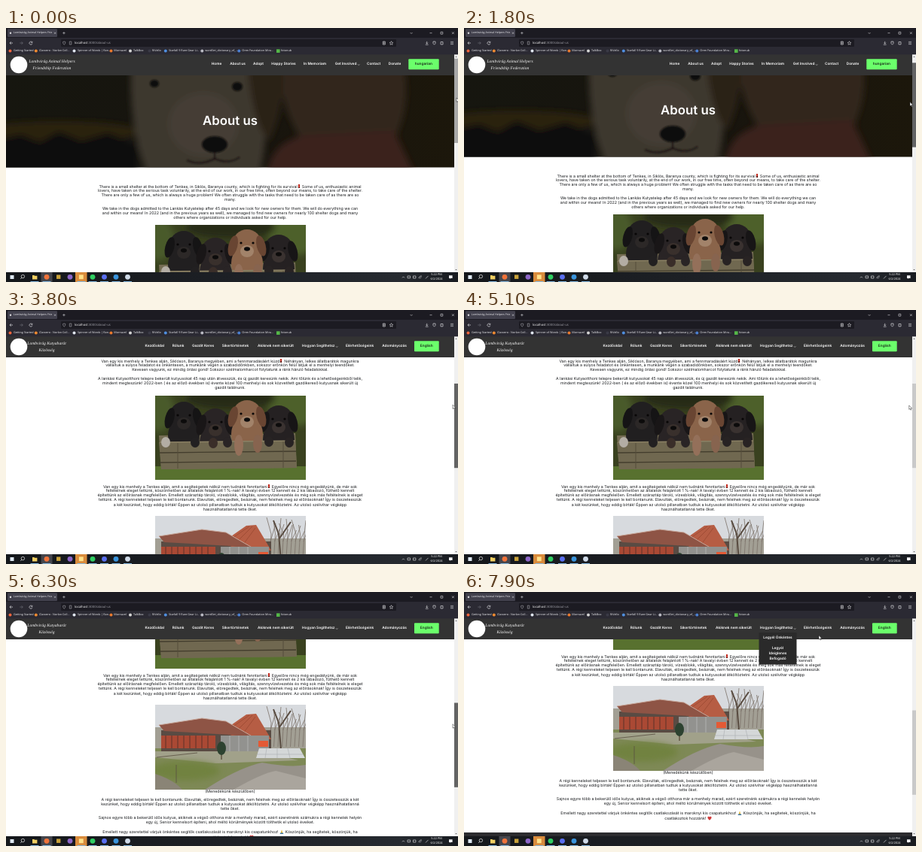
Write an HTML page that moves like this. It is 600 px wide and 338 px high and loops after 8 s.

```html
<!DOCTYPE html>
<html lang="en">
<head>
<meta charset="utf-8">
<title>Shelter site</title>
<style>
@property --s { syntax: "<number>"; inherits: true; initial-value: 0; }
@property --cx { syntax: "<number>"; inherits: true; initial-value: 0; }
@property --cy { syntax: "<number>"; inherits: true; initial-value: 0; }
html, body { margin: 0; width: 100%; height: 100%; overflow: hidden; background: #fff; }
#stage { position: relative; width: 600px; height: 338px; overflow: hidden; background: #fff;
  font-family: Inter, sans-serif; text-rendering: geometricPrecision;
  animation: s 8s linear -10ms infinite, cx 8s linear -10ms infinite, cy 8s linear -10ms infinite; }
#stage svg { position: absolute; left: 0; top: 0; overflow: visible; }
#doc { position: absolute; inset: 0; transform: translateY(calc(var(--s) * -1px)); }
#doc p { position: absolute; left: 0; width: 595px; margin: 0; text-align: center; white-space: pre;
  font-size: 5.27px; line-height: 6.09px; color: #16181b; }
#doc .foot { position: absolute; left: 0; width: 595px; height: 170px; background: #2c2c2f; color: #eee; font-size: 6px; }
.foot span { position: absolute; top: 12px; line-height: 8px; }
#doc .pic { left: 197.5px; width: 200px; height: 112.5px; overflow: hidden; }
#doc p svg { position: static; vertical-align: -1px; }
.mark { display: inline-block; width: 2px; height: 5.4px; margin: 0 1.5px 0 1px; vertical-align: -.8px; background: linear-gradient(#c0281c 70%, #5e120c 70%); }
.en { animation: en 8s step-end -10ms infinite; }
.hu { animation: hu 8s step-end -10ms infinite; }
.menu { animation: menu 8s step-end -10ms infinite; }
.thumb { transform: translateY(calc(var(--s) * .4px)); animation: thumb 8s step-end -10ms infinite; }
.cursor { transform: translate(calc(var(--cx) * 1px), calc((var(--cy) + var(--s) * .4) * 1px)); }
.ui { font-family: "Open Sans", sans-serif; }
.script { font: italic 5.6px "Liberation Serif", serif; }
text { dominant-baseline: central; }
.mid { text-anchor: middle; }
@keyframes en { 0% { visibility: visible } 32.5%, 100% { visibility: hidden } }
@keyframes hu { 0% { visibility: hidden } 32.5%, 100% { visibility: visible } }
@keyframes menu { 0% { visibility: hidden } 92.5%, 100% { visibility: visible } }
@keyframes thumb { 0% { fill: #a8a8a8 } 1.25% { fill: #636363 } 26.25% { fill: #c9c9c9 } 38.75% { fill: #636363 }
  51.25% { fill: #c9c9c9 } 65% { fill: #636363 } 90%, 100% { fill: #c9c9c9 } }
</style>
</head>
<body>
<div id="stage"></div>
<script>
const each = (list, fn) => list.map(fn).join('');
const rect = (x, y, w, h, fill, more = '') => `<rect x="${x}" y="${y}" width="${w}" height="${h}" fill="${fill}" ${more}/>`;
const oval = (x, y, rx, ry, fill, more = '') => `<ellipse cx="${x}" cy="${y}" rx="${rx}" ry="${ry}" fill="${fill}" ${more}/>`;
const dot = (x, y, r, fill) => oval(x, y, r, r, fill);
const path = (d, fill, more = '') => `<path d="${d}" fill="${fill}" ${more}/>`;
const line = (d, color, w = .6) => path(d, 'none', `stroke="${color}" stroke-width="${w}"`);
const text = (x, y, size, str, fill = '#fff', more = '') =>
  `<text x="${x}" y="${y}" font-size="${size}" fill="${fill}" ${more}>${str}</text>`;
const svg = (body, more = '') => `<svg width="600" height="338" ${more}>${body}</svg>`;

const track = (name, pts) => `@keyframes ${name}{` + each(pts, ([t, v], i) => {
  const next = pts[i + 1] || [t + 100];
  return `${t / 80}%{--${name}:${v};animation-timing-function:steps(${(next[0] - t) / 100})}`;
}) + '}';
const motion = document.createElement('style');
motion.textContent =
  track('s', [[0, 0], [100, 26], [300, 118], [500, 215], [700, 286], [800, 302], [900, 304], [1100, 304],
    [1200, 286], [1400, 196], [1600, 82], [1700, 42], [1800, 14], [1900, 4], [2000, 0], [3100, 0],
    [3300, 28], [3600, 112], [3800, 143], [5200, 143], [5400, 174], [5700, 216], [6000, 246],
    [6300, 267], [6700, 285], [7000, 292], [8000, 292]]) +
  track('cx', [[0, 598], [1100, 598], [1800, 592], [2000, 592], [2500, 556], [2700, 556], [3100, 593],
    [3900, 593], [4200, 584], [4300, 584], [4800, 578], [5200, 595], [6300, 593], [7100, 594],
    [7400, 440], [7600, 436], [7900, 471], [8000, 471]]) +
  track('cy', [[0, 93], [2000, 93], [2500, 47], [2700, 47], [3100, 69], [3900, 69], [4200, 76], [4300, 76],
    [4800, 72], [5200, 69], [7100, 69], [7400, -70], [7600, -62], [7900, -59], [8000, -59]]);
document.head.append(motion);

// Pictures
const soft = 'filter="url(#soft)"';
const hero = `<g clip-path="url(#band)">` + rect(0, 35, 595, 151, 'url(#dusk)') +
  `<g ${soft}>` +
  oval(70, 138, 110, 14, '#2a2411') +
  path('M-20 150L20 142 45 152 70 138 100 150 135 140 175 155V200H-20Z', '#100f0b') +
  path('M365 20H520Q545 90 515 150L400 160Q355 100 365 20Z', '#33281b') +
  path('M345 200Q350 150 400 142L515 136 545 200Z', '#3a231a') +
  path('M168 20H320Q360 110 335 200H190Q158 130 168 20Z', '#3d372e') +
  path('M318 20H362Q378 90 350 150 325 130 318 20Z', '#2b2119') +
  oval(262, 128, 46, 42, '#453e34') +
  '</g><g filter="url(#edge)">' +
  oval(197, 74, 6, 5, '#0e0b09') + oval(307, 78, 7, 6, '#0e0b09') +
  oval(277, 155, 17, 11, '#100d0b') + line('M277 165V174Q258 184 240 176M277 174Q296 182 310 172', '#1f1914', 2) + '</g></g>';

const pup = ([x, y, coat, ear, nose]) =>
  oval(x, y + 26, 21, 25, coat) + oval(x, y, 19, 19, coat) +
  oval(x - 18, y + 3, 6, 14, ear, `transform="rotate(14 ${x - 18} ${y})"`) +
  oval(x + 18, y + 3, 6, 14, ear, `transform="rotate(-14 ${x + 18} ${y})"`) +
  oval(x, y + 10, 9, 8, nose) + oval(x, y + 7, 4, 2.8, '#0c0b0b') +
  dot(x - 8, y - 1, 1.6, '#080606') + dot(x + 8, y - 1, 1.6, '#080606');
const pups = rect(0, 0, 200, 113, '#39411f') +
  `<g ${soft}>` + oval(185, 14, 34, 26, '#4e612b') + oval(4, 20, 22, 28, '#4a5a2b') + oval(100, 4, 60, 14, '#262b19') + '</g>' +
  rect(0, 94, 200, 19, '#58712f') +
  path('M5 53L186 50 188 96 8 98Z', '#756d54') +
  each([[38, 27, '#211f20', '#151415', '#2c2827'], [164, 32, '#252122', '#171516', '#3a3230'],
    [80, 36, '#292425', '#191617', '#39302c'], [122, 25, '#8a644a', '#694532', '#a2836a']], pup) +
  path('M5 62L186 60 188 96 8 98Z', '#706850') +
  line('M6 76L187 74M6 89L187 87', '#433d2d', 1.3) +
  line('M6 62L186 60', '#8b8164', 1.4) + line('M30 63V97M170 61V96', '#554d3a', 1) +
  each([[14, 62, '#b3ada4'], [53, 62, '#222021'], [77, 63, '#3a2e29'], [96, 62, '#292425'], [151, 61, '#272323'], [178, 62, '#282323']],
    ([x, y, c]) => oval(x, y, 6, 7, c)) +
  oval(111, 66, 6, 14, '#94705a') + oval(136, 64, 6, 12, '#87644f');

const branches = [...Array(9).keys()].map(i => {
  const x = 152 + i * 5.5, top = 2 + i * 7 % 13;
  return `M${x} 56L${x + 2} 24 ${x - 4 + i % 3 * 4} ${top}M${x + 1} 34L${x + 8} ${top + 8}`;
}).join('');
const shelter = rect(0, 0, 200, 113, '#d7dade') +
  rect(0, 30, 200, 32, '#a29f94') + line(branches, '#7b7169', .8) + line('M167 60L164 24 157 6M165 30L180 8', '#584b40', 2) +
  rect(0, 58, 200, 55, '#7e8956') + rect(8, 34, 146, 28, '#594b43') +
  path('M88 36L121 13 134 12 154 46H116Z', '#b65d44') + line('M96 34L125 14M105 38L129 14M114 42L133 16', '#95462f', .7) +
  path('M5 27L62 18 94 22 132 44 100 40 12 35Z', '#8e5445') + line('M5 27L62 18 94 22 132 44', '#c7a79a', 1) +
  rect(8, 41, 72, 17, '#aa4934') + line('M14 41V58M22 41V58M30 41V58M38 41V58M46 41V58M54 41V58M62 41V58M70 41V58', '#5c3228', 1) +
  rect(87, 41, 64, 22, '#92928f') + line('M99 41V63M111 41V63M123 41V63', '#b9bab8', .8) +
  rect(137, 48, 13, 8, '#e35a36') +
  path('M0 62L140 62 190 74 80 78 0 70Z', '#a1a18a') +
  path('M138 58H192L199 71H134Z', '#d4d7d8') + line('M135 66H196M148 58L146 71M162 58V71M176 58L179 71', '#a9adb0', .6) +
  oval(40, 88, 46, 13, '#71823f', soft) +
  path('M66 113Q110 84 142 77 180 84 200 80V113Z', '#97928a') + path('M104 113Q140 92 160 88L200 98V113Z', '#aaa59d') +
  path('M0 92Q25 100 36 113H0Z', '#8a8476') +
  line('M88 66V73', '#4f4030', 1.2) + oval(88, 58, 6, 9, '#2d4230') + line('M28 80V104M2 70L56 64', '#5a5042', .8);

const defs = `<defs>
<filter id="soft" x="-30%" y="-30%" width="160%" height="160%"><feGaussianBlur stdDeviation="4"/></filter>
<filter id="edge"><feGaussianBlur stdDeviation="1.2"/></filter>
<clipPath id="band"><rect y="35" width="595" height="150.5"/></clipPath>
<linearGradient id="dusk"><stop stop-color="#16160f"/><stop offset=".5" stop-color="#17140e"/><stop offset="1" stop-color="#1c170b"/></linearGradient>
<linearGradient id="bar"><stop stop-color="#14171b"/><stop offset=".5" stop-color="#1d2025"/><stop offset=".87" stop-color="#262a30"/><stop offset="1" stop-color="#181b20"/></linearGradient>
<g id="pups">${pups}</g><g id="shelter">${shelter}</g></defs>`;

// Page text
const hands = '<svg width="6" height="6" viewBox="0 0 6 6"><path d="M.4 6L2.2 3.6H3.8L5.6 6Z" fill="#3c78a8"/><path d="M3 .2L4.3 4.6H1.7Z" fill="#e5b93c"/></svg>';
const heart = '<svg width="6" height="6" viewBox="0 0 6 6"><path d="M3 5.7C-1.5 2.4.8-.5 3 1.3 5.2-.5 7.5 2.4 3 5.7Z" fill="#d23a3a"/></svg>';
const para = ([top, str]) => `<p style="top:${top - 3.4}px">` +
  str.replace(/❗/g, '<i class="mark"></i>').replace('🙏', hands).replace('❤', heart) + '</p>';
const pic = (top, id) => `<svg class="pic" style="top:${top}px"><use href="#${id}"/></svg>`;
const foot = (top, names) => `<div class="foot" style="top:${top}px">` +
  each(names, (n, i) => `<span style="left:${25 + i * 165.7}px">${n}</span>`) + '</div>';
const title = str => svg(text(297.5, 124, 16.8, str, '#fff', 'class="mid" font-weight="600"'));

const english = title('About us') + pic(262, 'pups') + pic(411, 'shelter') + each([
  [211, `There is a small shelter at the bottom of Tenkes, in Siklós, Baranya county, which is fighting for its survival❗ Some of us, enthusiastic animal
lovers, have taken on the serious task voluntarily, at the end of our work, in our free time, often beyond our means, to take care of the shelter.
There are only a few of us, which is always a huge problem! We often struggle with the tasks that need to be taken care of as there are so
many.`],
  [241.4, `We take in the dogs admitted to the Lankás Kutyatelep after 45 days and we look for new owners for them. We will do everything we can
and within our means! In 2022 (and in the previous years as well), we managed to find new owners for nearly 100 shelter dogs and many
others where organizations or individuals asked for our help.`],
  [384, `There is a small shelter at the bottom of Tenkes, which we could not maintain without your help❗ We don't have a license yet to function as
an official shelter, but we have already met many conditions, thanks to the 1% you offered! Last year, we built 12 kennels and 2 small
convalescent, heated kennels in accordance with the regulations. In addition, we also met the conditions for dry food storage, water block,
lighting, sewage drainage and many more.`],
  [526.5, '(Our shelter under construction)'],
  [538, `We have to completely demolish the old kennels. They are out of date, they are old, they get wet, they do not meet the regulations! We are
lucky that they lasted until now. We were able to move the dogs at the last minute. The last windstorm had rendered them completely
unusable.`],
  [562, `Unfortunately, there are more and more senior dogs coming in, whose final home will be the shelter, so we would like to build a new Senior
kennel series for them in place of the old kennels, where they can live out their last years in dignified conditions.`],
  [580, 'In addition, we warmly welcome volunteers to join our small team! 🙏 Thanks for your support and thanks for joining us! ❤']
], para) + foot(600, ['Contact Us', 'Quick Links', 'Support Us', 'Follow Us']);

const hungarian = title('Rólunk') + pic(256.5, 'pups') + pic(417, 'shelter') + each([
  [211, `Van egy kis menhely a Tenkes alján, Siklóson, Baranya megyében, ami a fennmaradásáért küzd❗ Néhányan, lelkes állatbarátok magunkra
vállaltuk a súlyos feladatot és önkéntesen, a munkánk végén a szabadidőnkben, sokszor erőnkön felül látjuk el a menhelyi teendőket.
Kevesen vagyunk, ez mindig óriási gond! Sokszor szélmalomharcot folytatunk a ránk háruló feladatokkal.`],
  [235.2, `A lankási Kutyaotthoni telepre bekerült kutyusokat 45 nap után átvesszük, és új gazdit keresünk nekik. Ami tőlünk és a lehetőségeinkből telik,
mindent megteszünk! 2022-ben ( és az előző években is) évente közel 100 menhelyi és sok közvetített gazdikereső kutyusnak sikerült új
gazdit találnunk.`],
  [378, `Van egy kis menhely a Tenkes alján, amit a segítségetek nélkül nem tudnánk fenntartani❗ Egyelőre nincs még engedélyünk, de már sok
feltételnek eleget tettünk, köszönhetően az általatok felajánlott 1 %-nak! A tavalyi évben 12 kennelt és 2 kis lábadozó, fűthető kennelt
építettünk az előírásnak megfelelően. Emellett száraztáp tároló, vízesblokk, világítás, szennyvízelvezetés és még sok más feltételnek is eleget
tettünk. A régi kenneleket teljesen le kell bontanunk. Elavultak, elöregedtek, beáznak, nem felelnek meg az előírásoknak! Így is összetesszük
a két kezünket, hogy eddig bírták! Éppen az utolsó pillanatban tudtuk a kutyusokat átköltöztetni. Az utolsó szélvihar végképp
használhatatlanná tette őket.`],
  [533, '(Menedékünk készülőben)'],
  [544, `A régi kenneleket teljesen le kell bontanunk. Elavultak, elöregedtek, beáznak, nem felelnek meg az előírásoknak! Így is összetesszük a két
kezünket, hogy eddig bírták! Éppen az utolsó pillanatban tudtuk a kutyusokat átköltöztetni. Az utolsó szélvihar végképp használhatatlanná
tette őket.`],
  [568, `Sajnos egyre több a bekerülő idős kutyus, akiknek a végső otthona már a menhely marad, ezért szeretnénk számukra a régi kennelek helyén
egy új, Senior kennelsort építeni, ahol méltó körülmények között tölthetik el utolsó éveiket.`],
  [586, `Emellett nagy szeretettel várjuk önkéntes segítők csatlakozását is maroknyi kis csapatunkhoz! 🙏 Köszönjük, ha segítetek, köszönjük, ha
csatlakoztok hozzánk! ❤`]
], para) + foot(612, ['Kapcsolat', 'Gyors Linkek', 'Támogatás', 'Kövess Minket']);

// Site header
const bold = 'class="mid" font-weight="600"';
const nav = (items, arrow, logo, logoX, btn, btnX) =>
  each(items, ([x, s]) => text(x, 48.4, 4.75, s, '#fff', bold)) + line(`M${arrow} 48.3l1.2 1.2 1.2-1.2`, '#fff', .5) +
  each(logo, (s, i) => `<text class="script mid" x="${logoX}" y="${44.5 + i * 9.8}" fill="#fff">${s}</text>`) +
  rect(btnX, 41.3, 574.7 - btnX, 14, '#6bff6b', 'rx="1"') +
  text((btnX + 574.5) / 2, 48.4, 4.75, btn, '#1c2b1c', bold);
const header = rect(0, 35, 595, 28, '#333') + dot(17, 49, 11.3, '#fff') +
  '<g class="en">' + nav([[279.5, 'Home'], [307.5, 'About us'], [335, 'Adopt'], [368.5, 'Happy Stories'], [410, 'In Memoriam'],
    [451, 'Get Involved'], [488, 'Contact'], [516, 'Donate']], 467, ['Lombvirág Animal Helpers', 'Friendship Federation'], 61, 'hungarian', 534.3) + '</g>' +
  '<g class="hu">' + nav([[197.3, 'Kezdőoldal'], [228.5, 'Rólunk'], [261.5, 'Gazdit Keres'], [304.5, 'Sikertörténetek'], [358, 'Akiknek nem sikerült'],
    [414.8, 'Hogyan Segíthetsz'], [469.5, 'Elérhetőségeink'], [515.5, 'Adományozás']], 438, ['Lombvirág Kutyabarát', 'Közösség'], 54, 'English', 542) + '</g>' +
  '<g class="menu">' + rect(391.5, 54, 50, 42.5, '#2a2a2a') +
  each([[60.5, 'Legyél Önkéntes'], [75.3, 'Legyél'], [82.3, 'Ideiglenes'], [89.3, 'Befogadó']], ([y, s]) => text(416.5, y, 4.75, s, '#fff', bold)) + '</g>';

const scrollbar = rect(595, 35, 5, 290, '#f0f0f0') + path('M596.3 39l1.2-1.6 1.2 1.6Z', '#666') + path('M596.3 321l1.2 1.6 1.2-1.6Z', '#666') +
  '<rect class="thumb" x="595" y="40.7" width="5" height="112.3"/>';

// Browser frame
const pale = '#f2f2f5';
const browser = rect(0, 0, 600, 13, '#1c1b22') + rect(0, 13, 600, 22.3, '#2b2a33') +
  rect(2, 1.3, 66, 10.6, '#42414d', 'rx="1.2"') + dot(6, 6.8, 1.2, '#d8d8dc') +
  text(10, 6.8, 3.6, 'Lombvirág Animal Helpers Frie', pale) +
  line('M64 5.6l2.2 2.2M66.2 5.6l-2.2 2.2M75.2 6.7h3.4M76.9 5v3.4M536.6 6l1.5 1.5 1.5-1.5', pale, .5) +
  line('M562.5 6.7h3M592 5.3l2.8 2.8M594.8 5.3L592 8.1M577 5.3h2.8v2.8H577Z', pale, .55) +
  rect(73, 15, 445, 10, '#1c1b22', 'rx="1.2"') +
  line('M9 20H5M6.7 18.2L5 20l1.7 1.8', pale, .6) + line('M18.3 20h4M20.6 18.2l1.7 1.8-1.7 1.8', '#75747d', .6) +
  line('M34.6 18.9a2 2 0 1 0 .3 1.8M34.9 17.8v1.6h-1.6', pale, .6) +
  line('M77.2 18l1.6.5c0 2-.5 3-1.6 3.7-1.1-.7-1.6-1.7-1.6-3.7ZM84.3 18h2.5v4h-2.5Z', '#c4c4ca', .5) +
  text(91, 20, 4.25, 'localhost<tspan fill="#a2a2aa">:3000/about-us</tspan>', '#fff') +
  line('M500.3 18h3v4h-3ZM501 19.2h1.6M501 20.6h1.6', pale, .6) +
  line('M511.5 17.6l.7 1.6 1.7.2-1.3 1.2.4 1.7-1.5-.9-1.5.9.4-1.7-1.3-1.2 1.7-.2Z', pale, .5) +
  line('M558.7 17.8v3M557.4 19.7l1.3 1.3 1.3-1.3M556.8 22.2h3.8M567 18h3v2.6l-1.5 1.6-1.5-1.6ZM577 18.5h3v3.4h-3Z', pale, .6) +
  line('M590 18.4h4M590 20h4M590 21.6h4', pale, .5) +
  each([[5.5, 10, 'Getting Started', '#f0643c'], [39.8, 44, 'Clasvero - Norlan Coll...', '#f08a30'], [90.5, 95, 'Spinner of Words | Ran...', '#dfe5ee'],
    [139.5, 143.3, 'Mornavel', '#e8782c'], [165, 169, 'TalkBox', '#d6d6d6'], [190.5, 194, 'RiVello', '#3a3a46'], [211.8, 216, 'Starfall 9 Rare Gear Li...', '#4f8fe0'],
    [260.3, 264.3, 'wordSet_dictionary_of_...', '#b9b9c2'], [309.3, 313.3, 'Oren Foundation Mira...', '#4b7fd0']],
    ([ix, x, s, c]) => dot(ix, 30.6, 2, c) + text(x, 30.7, 3.75, s, pale)) +
  rect(359, 28.3, 4.6, 4.6, '#55b848') + text(365, 30.7, 3.75, 'fotonub', pale);

// Taskbar
const taskbar = rect(0, 325, 600, 13, 'url(#bar)') + rect(46.5, 325, 15, 13, '#45464c') + rect(92, 325, 15.5, 13, '#d98b3c') +
  rect(5.5, 329, 5, 5, '#dfeaf5') + path('M24.6 330.6a2.2 2.2 0 1 1-4.4 0 2.2 2.2 0 1 1 4.4 0Zm-3.8 1.6-1.5 1.8', 'none', 'stroke="#eee" stroke-width=".7"') +
  path('M35 329h2.4l.6.7h3.4v4.8H35Z', '#f3cf62') +
  each([[54, '#f0733a'], [85, '#8d66c8'], [115, '#2fcf62'], [130.5, '#5a6ff0'], [146, '#3a94dc'], [161.5, '#cfdae8']], ([x, c]) => dot(x, 331.3, 3.4, c)) +
  rect(67, 328.5, 5.4, 5.4, '#c9a13a') + rect(96.9, 328.4, 5.8, 5.8, '#ffe28a') +
  each([38, 54, 100, 115, 130.5, 146, 161.5], x => rect(x - 5.5, 337, 11, 1, '#86b8e0')) +
  line('M526 332.4l1.5-1.5 1.5 1.5M533 330h3.6v2.8H533ZM540.5 330h3.4v3h-3.4ZM548 333.2a3 3 0 0 1 4-3M549.6 333.3a1.3 1.3 0 0 1 1.7-1.4M557 333.5l3.5-3.6', '#f0f0f2', .6) +
  text(571.5, 328.8, 3.9, '5:22 PM', '#fff', 'class="mid"') + text(571.5, 334.6, 3.9, '6/2/2024', '#fff', 'class="mid"') +
  path('M588 329.3h4.6v3.6h-2.2l-1 1v-1H588Z', '#f0f0f2');

const cursor = path('M0 0V5.4L1.3 4.2 2.2 6.2 3.1 5.8 2.2 3.9H3.9Z', '#fff', 'class="cursor" stroke="#111" stroke-width=".45"');

document.getElementById('stage').innerHTML =
  `<div id="doc">${svg(defs + hero)}<div class="en">${english}</div><div class="hu">${hungarian}</div></div>` +
  svg(header + scrollbar + `<g class="ui">${browser + taskbar}</g>` + cursor);
</script>
</body>
</html>
```
